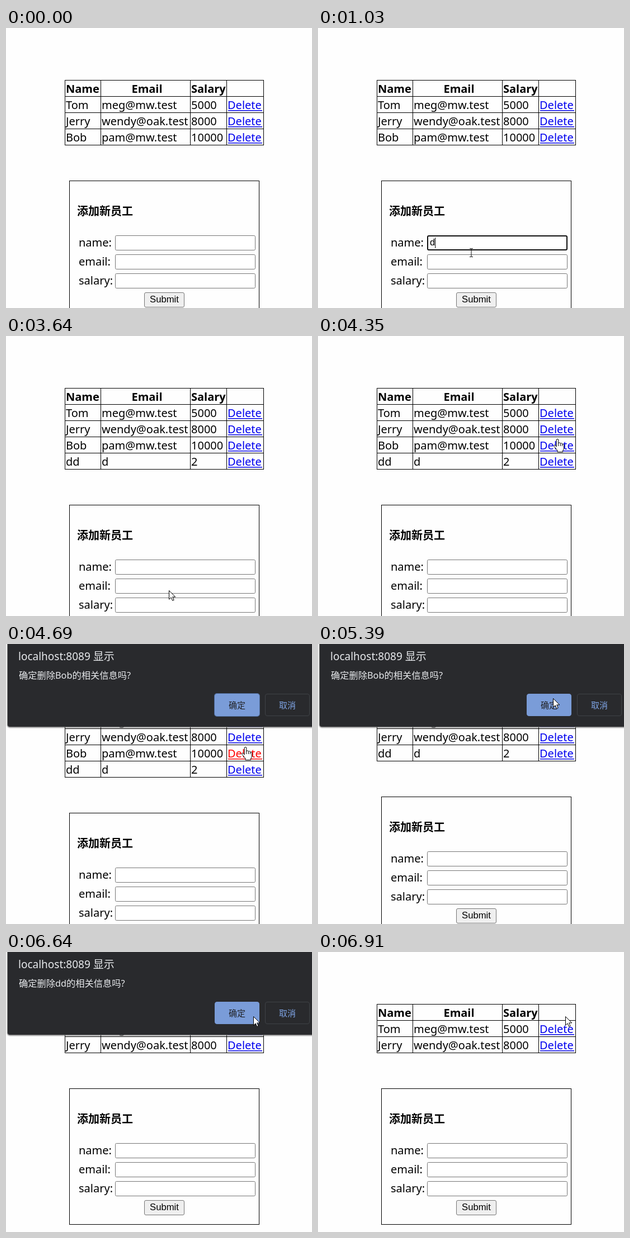
An HTML page that plays this animation: 547x501 px, repeating every 7510 ms.

```html
<!DOCTYPE html>
<html lang="zh">
<head>
<meta charset="utf-8">
<style>
html, body { margin: 0; width: 100%; height: 100%; overflow: hidden; background: #fefefe; }
svg { display: block; width: 547px; height: 501px; }
text { font: 20px 'Noto Sans', 'Noto Sans CJK SC', 'Noto Sans CJK', sans-serif; white-space: pre; }
.bold { font-weight: 700; }
.ui { font: 16.67px 'Liberation Sans', Arial, sans-serif; }
.head { font-size: 19px; }
.note { font-size: 16.25px; }
.small { font-size: 15px; }
</style>
</head>
<body>
<svg id="stage" viewBox="0 0 547 501" xmlns="http://www.w3.org/2000/svg"></svg>
<script>
const LOOP = 7510, STEP = 70;
const stage = document.getElementById('stage');

const TOM = ['Tom', 'meg@mw.test', '5000'];
const JERRY = ['Jerry', 'wendy@oak.test', '8000'];
const BOB = ['Bob', 'pam@mw.test', '10000'];
const NEW = ['dd', 'd', '2'];

// time, x, y of the hot spot, shape from that time on
const PATH = [
  [70, 286, 470, 'arrow'], [350, 276, 388, 'beam'], [630, 272, 386, 'beam'],
  [1320, 275, 418, 'beam'], [1820, 275, 420, 'beam'], [2010, 275, 461, 'beam'],
  [2340, 275, 461, 'beam'], [2480, 277, 455, 'beam'], [2760, 277, 455, 'beam'],
  [2940, 285, 470, 'arrow'], [3050, 288, 476, 'arrow'], [3580, 288, 476, 'arrow'],
  [3640, 291, 455, 'arrow'], [4200, 412, 205, 'hand'], [4340, 428, 184, 'hand'],
  [4700, 428, 184, 'hand'], [4830, 432, 140, 'arrow'], [5100, 436, 113, 'arrow'],
  [5180, 420, 97, 'arrow'], [5530, 420, 97, 'arrow'], [5740, 430, 184, 'hand'],
  [5880, 431, 188, 'hand'], [6160, 431, 188, 'hand'], [6290, 438, 140, 'arrow'],
  [6430, 442, 115, 'arrow'], [6910, 442, 115, '']
];

const text = (s, x, y, cls = '', fill = '#000', extra = '') =>
  `<text x="${x}" y="${y}" class="${cls}" fill="${fill}" ${extra}>${s}</text>`;
const box = (x, y, w, h, fill, stroke, r = 0, sw = 1) =>
  `<rect x="${x + sw / 2}" y="${y + sw / 2}" width="${w - sw}" height="${h - sw}" rx="${r}" fill="${fill}" stroke="${stroke}" stroke-width="${sw}"/>`;
const bar = (x, y, w, h, fill = '#000') =>
  `<rect x="${x}" y="${y}" width="${w}" height="${h}" fill="${fill}"/>`;
const MIDDLE = 'text-anchor="middle"';
const during = (t, a, b) => t >= a && t < b;

function table(rows, active) {
  const height = 29 * (rows.length + 1);
  let out = text('Name', 107, 116, 'bold') + text('Email', 252, 116, 'bold', '#000', MIDDLE)
    + text('Salary', 331, 116, 'bold');
  rows.forEach((row, i) => {
    const y = 145 + 29 * i;
    const color = row === active ? '#f00' : '#0000ee';
    out += text(row[0], 107, y) + text(row[1], 171, y) + text(row[2], 331, y)
      + text('Delete', 396, y, '', color) + bar(397, y + 2, 61, 1.5, color);
  });
  for (const x of [105, 169, 329, 394, 460]) out += bar(x, 93, 1, height + 1);
  for (let y = 93; y <= 93 + height; y += 29) out += bar(105, y, 356, 1);
  return out;
}

function form(top, values, focus) {
  let out = box(113, top, 340, 244, 'none', '#000') + text('添加新员工', 127, top + 61.5, 'bold');
  ['name:', 'email:', 'salary:'].forEach((label, i) => {
    const y = top + 98 + 34 * i, on = focus === i;
    out += text(label, 130, y + 20)
      + box(195, y, 251, 27, '#fff', on ? '#101010' : '#767676', 2, on ? 2 : 1)
      + text(values[i], 200, y + 18, 'ui');
    if (on) out += bar(200 + 9.27 * values[i].length, y + 4, 1, 19);
  });
  return out + box(247, top + 200, 72, 27, '#efefef', '#767676', 2.5)
    + text('Submit', 283, top + 218, 'ui', '#000', MIDDLE);
}

function dialog(name, ring) {
  return '<rect x="1" y="-8" width="560" height="159" rx="6" fill="#000" opacity=".14"/>'
    + '<rect x="2" y="-8" width="560" height="157.5" rx="5" fill="#777" opacity=".75"/>'
    + '<rect x="3" y="-8" width="560" height="156" rx="4" fill="#292a2d"/>'
    + text('localhost:8089 显示', 22, 28.5, 'head', '#e8eaed')
    + text(`确定删除${name}的相关信息吗?`, 23, 62, 'note', '#e8eaed')
    + (ring ? box(372, 88, 82, 42, 'none', '#4d6996', 4, 2) : '')
    + box(373, 89, 80, 40, '#7a9cd8', '#7a9cd8', 3.5)
    + text('确定', 413, 115, 'small', '#202124', MIDDLE)
    + box(463, 89, 80, 40, 'none', '#3f4246', 3.5)
    + text('取消', 503, 115, 'small', '#7fa5e6', MIDDLE);
}

const SHAPES = {
  arrow: '<path d="M.5 .5V16.2L4.1 12.8L6.7 18.5L9.2 17.4L6.7 11.9H11.8Z" fill="#fff" stroke="#000"/>',
  beam: '<path d="M-3 -7.5H-1Q0 -7.5 0 -6.5Q0 -7.5 1 -7.5H3M0 -6.5V6.5M-3 7.5H-1Q0 7.5 0 6.5Q0 7.5 1 7.5H3" fill="none" stroke="#111"/>',
  hand: '<path d="M-1.8 14V2Q-1.8 .4 0 .4T1.8 2V8Q2 6.6 3.6 6.8T5.4 8.4Q6 7.4 7.3 7.8T8.6 9.4Q11.4 8.6 11.6 11V16Q11.4 19 9.6 21V23.5H0V21L-5.8 13.6Q-7 11.4-5.2 11Q-4 10.7-1.8 14ZM1.8 8V13M5.4 8.6V13M8.6 9.6V13" fill="#fff" stroke="#000"/>'
};

function pointer(time) {
  const t = Math.floor(time / STEP) * STEP;
  const i = PATH.findLastIndex(key => key[0] <= t);
  if (i < 0 || !PATH[i][3]) return '';
  const [t0, x0, y0, kind] = PATH[i], [t1, x1, y1] = PATH[i + 1];
  const u = (t - t0) / (t1 - t0), k = u * u * (3 - 2 * u);
  const x = Math.round(x0 + (x1 - x0) * k), y = Math.round(y0 + (y1 - y0) * k);
  return `<g transform="translate(${x} ${y})">${SHAPES[kind]}</g>`;
}

function rowsAt(t) {
  if (t < 3180) return [TOM, JERRY, BOB];
  if (t < 5390) return [TOM, JERRY, BOB, NEW];
  return t < 6570 ? [TOM, JERRY, NEW] : [TOM, JERRY];
}

function valuesAt(t) {
  if (t >= 3180) return ['', '', ''];
  return ['dd'.slice(0, (t >= 840) + (t >= 1050)), t >= 1870 ? 'd' : '', t >= 2690 ? '2' : ''];
}

function focusAt(t) {
  if (t < 420 || t >= 3050) return -1;
  return t < 1660 ? 0 : t < 2480 ? 1 : 2;
}

function scene(t) {
  const rows = rowsAt(t);
  const active = during(t, 4420, 5390) ? BOB : during(t, 5880, 6570) ? NEW : null;
  let out = table(rows, active) + form(186 + 29 * rows.length, valuesAt(t), focusAt(t));
  if (during(t, 4490, 5530)) out += dialog('Bob', t < 5110);
  if (during(t, 6080, 6850)) out += dialog('dd', t < 6430);
  return out + pointer(t);
}

let shown = '';
const start = performance.now();
function draw() {
  const next = scene((performance.now() - start) % LOOP);
  if (next !== shown) stage.innerHTML = shown = next;
  requestAnimationFrame(draw);
}
draw();
</script>
</body>
</html>
```
